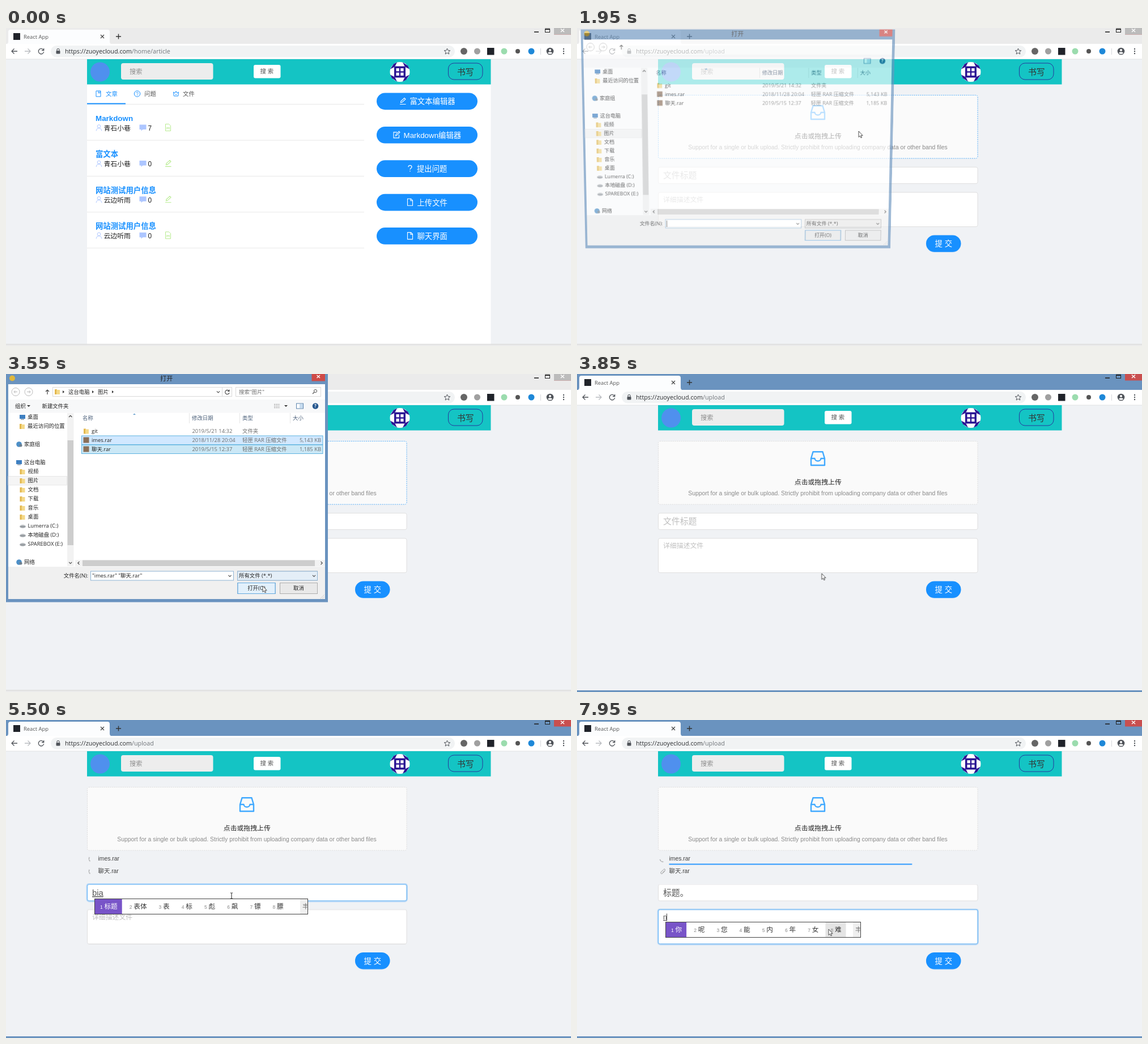
An HTML page that plays this animation: 997x561 px, repeating every 8000 ms.

```html
<!DOCTYPE html>
<html lang="zh-CN">
<head>
<meta charset="utf-8">
<title>Upload demo</title>
<style>
  html, body { margin: 0; width: 100%; height: 100%; overflow: hidden; background: #f0f2f5; }
  svg, #dialog { position: absolute; left: 0; top: 0; overflow: hidden; }
  text { font-family: 'Liberation Sans', 'Noto Sans CJK SC', 'Noto Sans CJK', sans-serif; white-space: pre; }
  .ui text { font-family: 'Open Sans', 'Noto Sans CJK SC', 'Noto Sans CJK', sans-serif; }
  #dialog { width: 568px; height: 403px; transform-origin: 284px 201px; }
</style>
</head>
<body>
<svg id="page" width="997" height="561"></svg>
<div id="dialog"><svg class="ui" width="568" height="403"></svg></div>
<svg id="overlay" width="997" height="561"></svg>
<script>
const LOOP = 8000, BLUE = '#1890ff', FRAME = '#6a93bf';

// Drawing helpers
const text = (x, mid, size, str, fill = '#333', extra = '') =>
  `<text x="${x}" y="${mid + size * .37}" font-size="${size}" fill="${fill}" ${extra}>${str}</text>`;
const rect = (x, y, w, h, fill, extra = '') =>
  `<rect x="${x}" y="${y}" width="${w}" height="${h}" fill="${fill}" ${extra}/>`;
const circle = (x, y, r, fill, extra = '') => `<circle cx="${x}" cy="${y}" r="${r}" fill="${fill}" ${extra}/>`;
const line = (d, stroke, width = 1, extra = '') =>
  `<path d="${d}" fill="none" stroke="${stroke}" stroke-width="${width}" ${extra}/>`;
const group = (id, body, extra = '') => `<g id="${id}" ${extra}>${body}</g>`;
const at = (x, y, body) => `<g transform="translate(${x} ${y})">${body}</g>`;
const middle = 'text-anchor="middle"';

// Small icons drawn around their own centre
const icons = {
  edit: c => line('M-5 5.5H5.5M-3.5 2.5L-3 0 3-5.5 5-3.5-1 2Z', c, 1.1),
  form: c => line('M1-4.5H-5V5.5H4.5V0M-1.5 2L-1-.5 4.5-6 6-4.5.5 1Z', c, 1.1),
  ask: c => line('M-3-2.5C-3-6.5 3-6.5 3-2.5 3-.5 0-.5 0 2M0 4V5.5', c, 1.3),
  file: c => line('M-4.5-6H1.5L4.5-3V6H-4.5ZM1-6V-2.5H4.5', c, 1.1),
  note: c => line('M-4.5-6H1.5L4.5-3V6H-4.5ZM-2 3.5V-.5L0 1.5 2-.5V3.5', c, 1),
  book: c => line('M-4-5H4V5H-4ZM0-5V-1L1.5-2 3-1V-5', c, 1),
  help: c => circle(0, 0, 5.2, 'none', `stroke="${c}"`) + line('M-1.7-1C-1.7-3.5 1.7-3.5 1.7-1 1.7 0 0 0 0 1.4M0 2.2V3.3', c, .9),
  crown: c => line('M-4.5-3L-2-1 0-4.5 2-1 4.5-3 3.7 4H-3.7ZM-1.3 1.5H1.3', c, 1),
  user: c => circle(0, -2.5, 2.8, 'none', `stroke="${c}"`) + line('M-4.8 5.5C-4.5-1 4.5-1 4.8 5.5', c),
  bubble: c => `<path d="M-6-5H6V3.5H0L-3 6V3.5H-6Z" fill="${c}"/>`,
  clip: c => line('M3.5-.5L-.5 3.5C-2.5 5.5-5 3-3 1L1.5-3.5C3-5 5-3 3.5-1.5L-.5 2.5', c, .9),
};
const icon = (name, x, y, colour) => at(x, y, icons[name](colour));

// Animation helpers: tables of [ms, value]
const origin = document.timeline.currentTime;
function track(id, prop, steps, easing = 'linear') {
  const all = [...steps];
  if (all[0][0] > 0) all.unshift([0, all[0][1]]);
  if (all.at(-1)[0] < LOOP) all.push([LOOP, all.at(-1)[1]]);
  const frames = all.map(([ms, value]) => ({ offset: ms / LOOP, [prop]: value, easing }));
  const anim = document.getElementById(id).animate(frames, { duration: LOOP, iterations: Infinity });
  anim.startTime = origin;
}
function show(id, ...spans) {
  const steps = spans.flatMap(([from, to]) => [[from, 1], [to, 0]]);
  if (steps[0][0] > 0) steps.unshift([0, 0]);
  track(id, 'opacity', steps, 'step-end');
}
const move = (x, y) => `translate(${x}px, ${y}px)`;

function browser() {
  const dark = '#50545a';
  return rect(0, 0, 997, 29, FRAME) + group('inactiveBar', rect(0, 0, 997, 29, '#ebebeb')) +
    '<path d="M0 28.5Q4 28 4 24V7Q4 3 8 3H179Q183 3 183 7V24Q183 28 187 28.5Z" fill="#fcfdfe"/>' +
    rect(13, 9, 12, 12, '#20232a') + text(31, 15.5, 9.4, 'React App', '#555') +
    line('M167 12L173 18M173 12L167 18', '#444', 1.2) + line('M194 15H203M198.5 10.5V19.5', '#333', 1.4) +
    line('M932 7H940', '#222', 1.6) + rect(951.5, 1.5, 8, 6, 'none', 'stroke="#222"') + line('M951 2H960', '#222', 2) +
    rect(967, 0, 30, 11.5, '#c94f4f') + group('inactiveClose', rect(967, 0, 30, 11.5, '#bcbcbc')) +
    line('M979 1.5L985 7M985 1.5L979 7', '#fff', 1.4) +
    rect(0, 28, 997, 27, '#fff') + rect(0, 54.5, 997, 1, '#dfe1e4') + rect(79, 31, 713, 20.5, '#f1f3f4', 'rx="10"') +
    line('M20 41H10M14.5 36.5L10 41 14.5 45.5', dark, 1.3) + line('M33 41H43M38.5 36.5L43 41 38.5 45.5', '#b9bcc0', 1.3) +
    line('M66 38.5A4.7 4.7 0 1 0 66.7 42M66.7 36V39.5H63', dark, 1.3) +
    rect(88.5, 40, 7, 5.5, dark, 'rx="1"') + line('M90 40V38.5A2 2 0 0 1 94 38.5V40', dark, 1.1) +
    group('urlHome', text(104, 41, 10.75, 'https://zuoyecloud.com<tspan fill="#70757a">/home/article</tspan>', '#2b2d30')) +
    group('urlUpload', text(104, 41, 10.75, 'https://zuoyecloud.com<tspan fill="#70757a">/upload</tspan>', '#2b2d30')) +
    line('M778.5 36L780 39.5 783.8 39.8 780.9 42.2 781.8 46 778.5 44 775.2 46 776.1 42.2 773.2 39.8 777 39.5Z', dark) +
    circle(808, 41, 6, '#666') + circle(831.5, 41, 5.5, '#a0a0a0') + rect(849, 35, 12.5, 12.5, '#20232a') +
    circle(879, 41, 5.5, '#9bdcae') + circle(903, 41, 4, '#555') + circle(927, 41, 5.5, '#1e88d8') +
    rect(943, 36, 1, 11, '#d5d8dc') + circle(960, 41, 6.3, '#50545a') + circle(960, 39, 2, '#fff') +
    '<path d="M956 44.2C957 41.5 963 41.5 964 44.2 962 46.3 958 46.3 956 44.2Z" fill="#fff"/>' +
    [37, 41, 45].map(y => circle(984, y, 1.2, dark)).join('');
}

function siteHeader() {
  const ink = '#2b1493';
  const corners = [0, 90, 180, 270].map(a =>
    `<path d="M-17-5L-11-14-5-17-8-11-11-8Z" fill="${ink}" transform="rotate(${a})"/>`).join('');
  const holes = [-6.5, 1.2].flatMap(x => [-6.5, 1.2].map(y => rect(x, y, 5.3, 5.3, '#fff'))).join('');
  return rect(143, 55, 712.5, 44.5, '#14c4c4') + circle(166, 77.5, 17, '#4f90ee') +
    rect(203, 62, 162.5, 29, '#ededed', 'rx="4"') + text(218, 76.5, 11.2, '搜索', '#8c8c8c') +
    rect(437, 65, 47.5, 23.5, '#fff', 'rx="3"') + text(448.5, 76.5, 10.39, '搜 索', '#555') +
    at(695, 77.5, circle(0, 0, 17.5, '#fff') + corners + rect(-10, -10, 20, 20, ink) + holes) +
    rect(780.5, 62, 60.5, 29, 'none', `rx="10" stroke="${ink}" stroke-width=".8"`) + text(796, 77.5, 14.85, '书写', '#333');
}

function home() {
  const tabs = [['book', 163, 176, '文章', BLUE], ['help', 231.5, 244, '问题', '#595959'], ['crown', 300, 312, '文件', '#595959']];
  const posts = [['Markdown', '青石小巷', 7, 'note'], ['富文本', '青石小巷', 0, 'edit'],
    ['网站测试用户信息', '云边听雨', 0, 'edit'], ['网站测试用户信息', '云边听雨', 0, 'note']];
  const actions = [['edit', 700, 712.5, '富文本编辑器'], ['form', 689, 701.5, 'Markdown编辑器'],
    ['ask', 713, 725, '提出问题'], ['file', 713, 725.5, '上传文件'], ['file', 713, 725.5, '聊天界面']];
  return rect(143, 99.5, 712.5, 458.5, '#fff') + rect(143, 134, 489, 1, '#e8e8e8') + rect(143, 132.5, 68, 2, BLUE) +
    tabs.map(([name, ix, x, label, c]) => icon(name, ix, 116, BLUE) + text(x, 116, 10.39, label, c)).join('') +
    posts.map(([title, author, count, kind], i) => at(0, i * 63.4,
      text(158, 159, 13.36, title, BLUE, 'font-weight="bold"') + icon('user', 164, 176, '#adc6ff') +
      text(172.5, 176.5, 11.87, author, '#222') + icon('bubble', 241.5, 175.5, '#adc6ff') +
      text(250.5, 176.5, 11.87, count, '#222') + icon(kind, 286, 175.5, '#b7eb8f') + rect(143, 197.5, 489, 1, '#e8e8e8'))).join('') +
    actions.map(([name, ix, x, label], i) => {
      const y = 114.5 + i * 59.4;
      return rect(654, y, 178, 29.7, BLUE, 'rx="14.85"') +
        (i === 3 ? group('hoverUpload', rect(654, y, 178, 29.7, '#40a9ff', 'rx="14.85"')) : '') +
        icon(name, ix, y + 14.5, '#fff') + text(x, y + 15, 13.36, label, '#fff');
    }).join('');
}

function field(name, y, h) {
  const box = (fill, stroke) => rect(143.5, y, 563.5, h, fill, `rx="3" stroke="${stroke}" stroke-width=".8"`);
  const glow = rect(142.5, y - 1, 565.5, h + 2, 'none', 'rx="4" stroke="#1890ff" stroke-opacity=".25" stroke-width="2"');
  return box('#fff', '#d9d9d9') + group(name + 'Focus', glow + box('none', '#40a9ff'));
}

function ime(id, y, width, words, hover) {
  let x = 166, cells = '';
  words.forEach((word, i) => {
    const first = i === 0, cell = 24.5 + 11.6 * word.length;
    if (first || i === hover) cells += rect(x - 9, y + 1, cell, 26, first ? '#7854c8' : '#e4e4e4');
    cells += text(x, y + 15, 8.5, i + 1, first ? '#fff' : '#888') + text(x + 7.5, y + 14, 11.6, word, first ? '#fff' : '#333');
    x += cell + 4.1;
  });
  const end = 156 + width;
  return group(id, rect(156.5, y + .5, width - 1, 27, '#fff', 'stroke="#444"') + cells +
    rect(end - 14, y + 1, 13, 26, '#efefef') + text(end - 10, y + 14, 11.6, '丰', '#777', 'clip-path="inset(0 3px 0 0)"'));
}

const pinyin = ['b', 'bi', 'bia', 'biao', 'biaot', 'biaoti'];

function upload() {
  const dragger = stroke =>
    rect(143.5, 118.5, 563.5, 111.5, 'none', `rx="3" stroke="${stroke}" stroke-width=".8" stroke-dasharray="2.2 1.5"`);
  const spinner = id => group(id, line('M-5.2 0A5.2 5.2 0 0 1 0-5.2', '#8c8c8c', 1));
  const fileRow = (n, y, name) => at(151.5, y + 1, group('wait' + n, spinner('spin' + n))) + text(162.5, y, 10.39, name, '#404040') +
    at(162.5, y + 9.5, group('bar' + n, rect(0, 0, 544.5, 1.8, BLUE)));
  return rect(143.5, 118.5, 563.5, 111.5, '#fafafa', 'rx="3"') + dragger('#d9d9d9') +
    group('dragHover', rect(143.5, 118.5, 563.5, 111.5, '#fafafa') + dragger('#40a9ff')) +
    line('M416.5 137.3H433.5L437 149V161H413V149ZM413 149H419.5C420 155 430 155 430.5 149H437', '#40a9ff', 2.4, 'stroke-linejoin="round"') +
    text(425.3, 190.5, 11.87, '点击或拖拽上传', '#262626', middle) +
    text(425, 210, 10.39, 'Support for a single or bulk upload. Strictly prohibit from uploading company data or other band files', '#8a8a8a', middle) +
    group('files', fileRow(1, 244, 'imes.rar') + fileRow(2, 266, '聊天.rar') + group('done2', icon('clip', 151.5, 267, '#8c8c8c'))) +
    group('form', field('title', 245.5, 29) + field('detail', 290, 60.5) +
      group('titleHint', text(152, 260, 14.85, '文件标题', '#bfbfbf')) +
      pinyin.map((s, i) => group('py' + i, text(152, 260, 14.85, s, '#555', 'text-decoration="underline"'))).join('') +
      group('title1', text(152, 260, 14.85, '标题', '#555')) + group('title2', text(152, 260, 14.85, '标题。', '#555')) +
      group('titleCaret', rect(152, 253, 1, 14, '#444')) +
      group('detailHint', text(152, 303, 11.87, '详细描述文件', '#bfbfbf')) +
      group('detailCaret', rect(152, 297, 1, 13, '#444')) +
      group('detailText', text(152, 303, 11.87, 'n', '#555', 'text-decoration="underline"') + rect(158, 297, 1, 13, '#444')) +
      rect(616, 366, 61.5, 30, '#1890ff', 'rx="15" opacity=".25"') + rect(616, 365.5, 61.5, 29.5, BLUE, 'rx="14.75"') +
      text(646.8, 380.3, 13.36, '提 交', '#fff', middle + ' font-weight="500"'));
}

function dialog() {
  const S = 9.4, ink = '#222', grey = '#6d6d6d';
  const folder = (x, y) => rect(x, y - 4, 4, 9, '#e3b84f') + rect(x + 3, y - 3, 6, 8, '#f4d989');
  const drive = (x, y) => `<ellipse cx="${x + 5}" cy="${y + 1}" rx="5.5" ry="3" fill="#b4b8bc"/>` + rect(x + 1, y + 1, 8, 1, '#70767c');
  const screen = (x, y) => rect(x, y - 4, 10, 7, '#3d7fc1') + rect(x + 2, y + 3.5, 6, 1.2, '#789');
  const globe = (x, y) => circle(x + 5, y, 4.8, '#4c8fc7') + circle(x + 8, y + 2, 2.5, '#6d7f8f');
  const side = [[38, 76, '桌面', screen], [38, 92, '最近访问的位置', folder], [32, 124, '家庭组', globe], [32, 156, '这台电脑', screen],
    ...['视频', '图片', '文档', '下载', '音乐', '桌面'].map((s, i) => [38.5, 172 + 16 * i, s, folder]),
    ...['Lumerra (C:)', '本地磁盘 (D:)', 'SPAREBOX (E:)'].map((s, i) => [38.5, 268 + 16 * i, s, drive]), [32, 332, '网络', globe]];
  const rows = [['git', '2019/5/21 14:32', '文件夹', ''], ['imes.rar', '2018/11/28 20:04', '轻匣 RAR 压缩文件', '5,143 KB'],
    ['聊天.rar', '2019/5/15 12:37', '轻匣 RAR 压缩文件', '1,185 KB']];
  const heads = [[135, '名称'], [328, '修改日期'], [417, '类型'], [506, '大小']];
  const selected = (id, y, fill) => group(id, rect(133.5, y, 425.5, 15.5, fill, 'stroke="#5fb3e0"'));
  const down = (x, y) => line(`M${x - 2.5} ${y - 1.2}L${x} ${y + 1.5} ${x + 2.5} ${y - 1.2}`, '#444', 1.1);
  const button = (x, label) => rect(x, 368.5, 66, 19, '#e9e9e9', 'stroke="#adadad"') + text(x + 33, 378, S, label, ink, middle);
  return rect(0, 0, 568, 402.5, FRAME) + circle(11, 7.5, 5, '#e0b83c') + text(272, 7.5, 11.2, '打开', '#222') +
    rect(539.5, 0, 23.5, 12.5, '#cf4b47') + line('M548.5 2L554 7M554 2L548.5 7', '#fff', 1.4) +
    rect(4, 18, 559, 379, '#fff') + rect(4, 45, 559, 23.5, '#f7f8f9') +
    circle(17, 31.5, 7, 'none', 'stroke="#bbb"') + line('M20 31.5H14M16.5 29L14 31.5 16.5 34', '#bbb') +
    circle(40, 31.5, 7, 'none', 'stroke="#bbb"') + line('M37 31.5H43M40.5 29L43 31.5 40.5 34', '#bbb') +
    line('M73 36V28M70 31L73 28 76 31', '#444', 1.2) +
    group('dialogTop', rect(82.5, 23.5, 316, 16, '#fff', 'stroke="#d9d9d9"') + rect(381, 24, 1, 15, '#d9d9d9') + folder(86, 31) +
      ['M100 29L103 31.5 100 34Z', 'M152 29L155 31.5 152 34Z', 'M187 29L190 31.5 187 34Z'].map(d => `<path d="${d}" fill="#333"/>`).join('') +
      text(110, 31.5, S, '这台电脑', ink) + text(162, 31.5, S, '图片', ink) + down(374.5, 31.5) +
      line('M393.5 30A3.7 3.7 0 1 0 394 33M394 27.5V30.5H391', '#444', 1.1) +
      rect(405.5, 23.5, 150, 16, '#fff', 'stroke="#d9d9d9"') + text(411, 31.5, S, '搜索"图片"', grey) +
      circle(546, 30, 2.6, 'none', 'stroke="#555"') + line('M544 32L541 35', '#555', 1.2) +
      text(16, 56.5, S, '组织', ink) + '<path d="M37 55H43L40 58Z" fill="#333"/>' + text(63.5, 56.5, S, '新建文件夹', ink) +
      line('M473 53.5H483M473 56.5H483M473 59.5H483', '#888', 1.2, 'stroke-dasharray="2 1"') + '<path d="M491 55H497L494 58Z" fill="#333"/>') +
    rect(512.5, 52, 12, 9, '#fff', 'stroke="#5b83ad"') + rect(518, 53, 6, 7, '#c7dcf0') +
    circle(546, 56.5, 5.3, '#27588f') + text(546, 56.5, 8, '?', '#fff', middle + ' font-weight="bold"') +
    rect(4, 180.5, 103.5, 15.5, '#f5f5f5', 'stroke="#e3e3e3" stroke-width=".8"') +
    side.map(([x, y, label, draw]) => draw(x - 14, y) + text(x, y, S, label, ink)).join('') +
    rect(108, 69, 11.5, 270, '#f2f2f2') + rect(108.5, 117, 10.5, 185, '#cdcdcd') +
    line('M111 76L113.7 73.3 116.4 76', '#444', 1.2) + down(113.7, 333) +
    heads.map(([x, label], i) => text(x, 78, S, label, '#4c607a') + (i ? rect(x - 5, 69, 1, 18, '#e5e5e5') : '')).join('') +
    '<path d="M224 72L226.5 69.5 229 72Z" fill="#6da3cf"/>' +
    group('rowHover', rect(133.5, 109, 425.5, 15.5, '#e5f3fb')) + selected('pick1', 109, '#d1e8ff') + selected('pick2', 125, '#cbe8f6') +
    rows.map(([name, date, kind, size], i) => {
      const y = 100.5 + 16 * i;
      return (i ? rect(136.5, y - 5, 10, 10, '#8a6f58') : folder(137, y)) + text(151, y, S, name, ink) +
        text(328.5, y, S, date, grey) + text(417, y, S, kind, grey) + text(556, y, S, size, grey, 'text-anchor="end"');
    }).join('') +
    rect(122, 328, 441, 11.5, '#f2f2f2') + rect(135, 328.5, 410, 10.5, '#cdcdcd') +
    line('M129.5 330.8L126.8 333.5 129.5 336.2M555.5 330.8L558.2 333.5 555.5 336.2', '#444', 1.2) +
    rect(4, 340, 559, 57, '#f0f0f0') + text(145, 356, S, '文件名(N):', ink, 'text-anchor="end"') +
    rect(149.5, 348, 252, 16, '#fff', 'stroke="#8fb4d4"') + down(395, 356) +
    group('nameCaret', rect(151.5, 350, 1, 12, '#222')) + group('name1', text(152, 356, S, 'imes.rar', ink)) +
    group('name2', text(152, 356, S, '"imes.rar" "聊天.rar"', ink)) +
    rect(408.5, 348, 141, 16, '#e6e6e6', 'stroke="#b0b0b0"') +
    group('comboHover', rect(408.5, 348, 141, 16, '#e4eef7', 'stroke="#8fb4d4"')) +
    text(411, 356, S, '所有文件 (*.*)', ink) + down(543.5, 356) +
    button(409, '打开(O)') + rect(409, 368.5, 66, 19, 'none', 'stroke="#62a8de"') +
    group('openHover', rect(409, 368.5, 66, 19, '#e2f0fb', 'stroke="#62a8de"') + text(442, 378, S, '打开(O)', ink, middle)) +
    button(483.5, '取消') + line('M555 396L562 389M558.5 396L562 392.5', '#bbb', 1, 'stroke-dasharray="1.5 1"');
}

document.getElementById('page').innerHTML = rect(0, 0, 997, 561, '#f0f2f5') + group('browser', browser(), 'class="ui"') +
  group('home', home()) + group('upload', upload()) + siteHeader() +
  rect(0, 558, 997, 3, FRAME) + group('inactiveEdge', rect(0, 557.5, 997, 3.5, '#ebebeb') + rect(0, 557.5, 997, 1, '#d5d5d5')) +
  group('status', rect(-2, 541.5, 333, 16.5, '#fff', 'rx="2" stroke="#d5d5d5"') + text(0, 550, 9.2, 'https://zuoyecloud.com/upload', '#666'), 'class="ui"');
document.querySelector('#dialog svg').innerHTML = dialog();
document.getElementById('overlay').innerHTML =
  ime('imeTitle', 315, 377, ['标题', '表体', '表', '标', '彪', '飙', '镖', '膘'], -1) +
  ime('imeDetail', 356, 345, ['你', '呢', '您', '能', '内', '年', '女', '难'], 7) +
  group('cursor', group('arrow', '<path d="M0 0V10.5L2.4 8.3 4 11.8 5.6 11.1 4.1 7.7H7.2Z" fill="#fff" stroke="#222" stroke-width=".8"/>') +
    group('beam', line('M-2-5H-.5L0-4.5.5-5H2M0-4.5V4.5M-2 5H-.5L0 4.5.5 5H2', '#222', 1)));

// Window and pages
for (const id of ['inactiveBar', 'inactiveClose', 'inactiveEdge']) show(id, [0, 100], [1750, 3750]);
for (const id of ['home', 'urlHome']) show(id, [0, 850]);
for (const id of ['upload', 'urlUpload']) show(id, [850, LOOP]);
show('hoverUpload', [450, 850]);
show('status', [450, 1150]);
show('dragHover', [1250, 3850]);

// File dialog
const tilted = 'translateY(-2.7px) perspective(1000px) rotateX(-4.6deg) scale(.962)';
const flat = 'translateY(0px) perspective(1000px) rotateX(0deg) scale(1)';
track('dialog', 'opacity', [[1880, 0], [1900, .3], [1950, .65], [2050, 1], [3680, 1], [3800, 0]]);
track('dialog', 'transform', [[1850, 'translateY(-6px) perspective(1000px) rotateX(-9deg) scale(.92)'],
  [1950, tilted], [2100, flat], [3680, flat], [3800, tilted]]);
show('dialogTop', [2050, LOOP]);
show('rowHover', [2600, 2750]);
show('pick1', [2750, LOOP]);
show('pick2', [3000, LOOP]);
show('nameCaret', [0, 2750]);
show('name1', [2750, 3000]);
show('name2', [3000, LOOP]);
show('comboHover', [3300, LOOP]);
show('openHover', [3380, LOOP]);

// Uploads
show('files', [3880, LOOP]);
track('form', 'transform', [[3870, move(0, 0)], [3950, move(0, 44.5)]]);
const spin = [[3900, 'rotate(-102deg)'], [4300, 'rotate(0deg)'], [6600, 'rotate(585deg)'], [7950, 'rotate(980deg)'], [LOOP, 'rotate(995deg)']];
track('spin1', 'transform', spin);
track('spin2', 'transform', spin);
track('bar1', 'transform', [[6900, 'scaleX(0)'], [7950, 'scaleX(.787)'], [LOOP, 'scaleX(.82)']]);
track('bar2', 'transform', [[6000, 'scaleX(0)'], [6600, 'scaleX(.448)'], [7150, 'scaleX(1)']]);
show('bar2', [6000, 7200]);
show('wait2', [0, 7200]);
show('done2', [7200, LOOP]);

// Typing
show('titleFocus', [4700, 7450]);
show('titleHint', [0, 5250]);
show('titleCaret', [4700, 5200]);
const keys = [5250, 5400, 5500, 5600, 5750, 5900, 6350];
pinyin.forEach((_, i) => show('py' + i, [keys[i], keys[i + 1]]));
show('imeTitle', [5250, 6350]);
show('title1', [6350, 6950]);
show('title2', [6950, LOOP]);
show('detailFocus', [7450, LOOP]);
show('detailHint', [0, 7700]);
show('detailCaret', [7450, 7700]);
show('detailText', [7700, LOOP]);
show('imeDetail', [7700, LOOP]);

// Pointer
show('arrow', [100, 4100], [7680, LOOP]);
show('beam', [4100, 7680]);
track('cursor', 'transform', [[100, 870, 470], [500, 753, 316], [1050, 753, 316], [1450, 497, 182], [2100, 497, 182],
  [2450, 300, 150], [2600, 260, 118], [2800, 200, 118], [2950, 190, 132], [3050, 190, 132], [3420, 453, 374], [3650, 453, 374],
  [3900, 430, 350], [4200, 398, 313], [4400, 398, 313], [4600, 398, 310], [6950, 398, 310], [7250, 430, 404],
  [7450, 440, 378], [7700, 444, 369]].map(([ms, x, y]) => [ms, move(x, y)]), 'ease-in-out');
</script>
</body>
</html>
```
